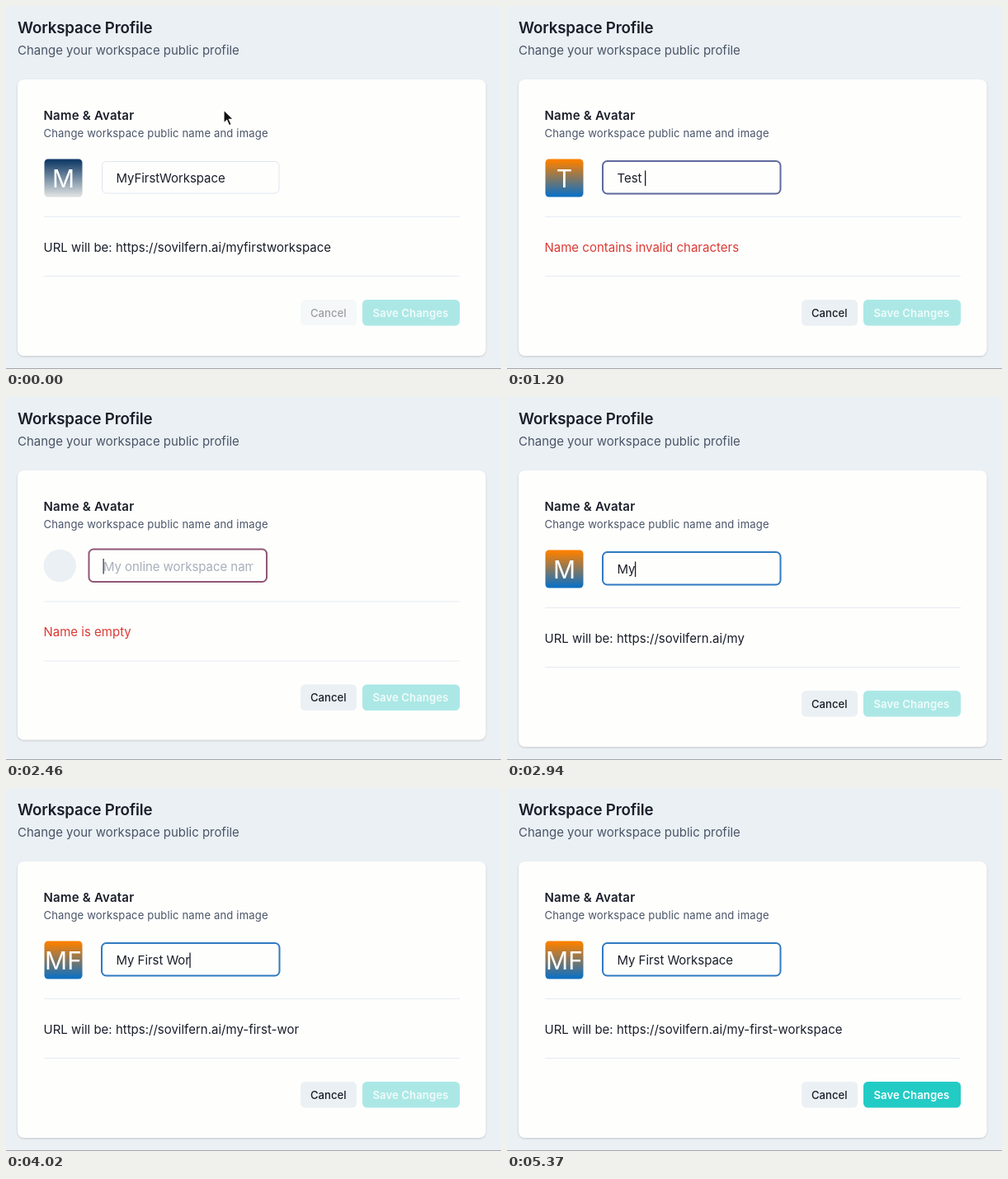
An HTML page that plays this animation: 600x440 px, repeating every 5400 ms.

```html
<!DOCTYPE html>
<html lang="en">
<head>
<meta charset="utf-8">
<title>Workspace profile</title>
<style>
  html, body { margin: 0; width: 100%; height: 100%; overflow: hidden; background: #ebf0f4; }
  svg { display: block; width: 600px; height: 440px; }
  text { font: 400 15px Inter, "Liberation Sans", sans-serif; fill: #1a1e29; white-space: pre; }
  .title { font-size: 18.7px; font-weight: 600; letter-spacing: -.15px; }
  .muted { fill: #4a5568; }
  .subtitle { letter-spacing: -.03px; }
  .strong { font-weight: 600; letter-spacing: .22px; }
  .small { font-size: 13.1px; letter-spacing: .13px; }
  .button { font-size: 13.1px; font-weight: 500; }
  .save { font-weight: 600; letter-spacing: .1px; }
  #name { letter-spacing: -.06px; }
  #message { letter-spacing: 0; }
  #initials { font-size: 30px; fill: #fff; text-anchor: middle; }
  .rule { stroke: #e6ebf2; }
</style>
</head>
<body>
<svg viewBox="0 0 600 440">
  <defs>
    <linearGradient id="fade" x1="0" y1="0" x2="0" y2="1">
      <stop offset=".05"/><stop offset=".95"/>
    </linearGradient>
    <clipPath id="inside"><rect x="132" y="190" width="183" height="36"/></clipPath>
    <filter id="shadow" x="-5%" y="-5%" width="110%" height="110%">
      <feDropShadow dx="0" dy="1" stdDeviation="1.2" flood-color="#1a202c" flood-opacity=".2"/>
    </filter>
  </defs>

  <rect width="600" height="440" fill="#ebf0f4"/>
  <rect y="439" width="600" height="1" fill="#a3a6ac"/>
  <text class="title" x="14" y="33">Workspace Profile</text>
  <text class="muted subtitle" x="14" y="59">Change your workspace public profile</text>

  <rect id="card" x="14" y="89" width="567.5" height="335" rx="8" fill="#fefefd" filter="url(#shadow)"/>
  <text class="strong" x="45.5" y="138">Name &amp; Avatar</text>
  <text class="muted small" x="45.5" y="158.5">Change workspace public name and image</text>

  <circle id="blank" cx="65.3" cy="204.5" r="19.7" fill="#ebf0f4"/>
  <g id="avatar">
    <rect x="46.5" y="185.5" width="46" height="46" rx="4.5" fill="url(#fade)"/>
    <text id="initials" x="69.5" y="219.5"></text>
  </g>

  <g id="field">
    <rect id="border" fill="#fefefd"/>
    <g clip-path="url(#inside)">
      <rect id="selection" x="133" y="199" height="19" fill="#b7d8f8"/>
      <text id="name" x="133.5" y="214"></text>
    </g>
    <rect id="caret" y="199.5" width="1.3" height="18.5"/>
  </g>

  <g id="lower">
    <path class="rule" d="M46 255.5H550M46 327.5H550"/>
    <text id="message" x="45.5" y="297.5"></text>
    <g id="cancel">
      <rect x="357" y="356" width="68" height="31.5" rx="5.5" fill="#ebf0f4"/>
      <text class="button" x="369" y="376.5">Cancel</text>
    </g>
    <rect id="save" x="432" y="356" width="118" height="31.5" rx="5.5"/>
    <text id="saveLabel" class="button save" x="444.5" y="376.5">Save Changes</text>
  </g>

  <path id="arrow" d="M0 0V15.8L3.7 12.4 6.5 18.7 9.2 17.5 6.4 11.4H11.5Z" fill="#111" stroke="#fff" stroke-width="1.1"/>
  <path id="beam" d="M-3-8Q0-8 0-5V5Q0 8-3 8M3-8Q0-8 0-5V5Q0 8 3 8" fill="none" stroke="#222"/>
</svg>

<script>
const LOOP = 5400, STEP = 30;
const FIRST = "MyFirstWorkspace";
const ADDRESS = "https://sovilfern.ai/";
const FOCUS = 240, SELECT = 300, CLEAR = 390, SAVE = 4890;
const GREY = [224, 230, 240], BLUE = [49, 122, 192], RED = [214, 60, 62];

const gradients = {
  night: ["#123c68", "#d9dddd"],
  dusk: ["#f98000", "#1070c0"],
  lagoon: ["#109bf0", "#85eda8"],
  ember: ["#fc4322", "#da1c62"]
};

// Start time, field content, avatar gradient
const edits = [
  [0, FIRST, "night"], [CLEAR, "", "night"],
  [540, "T", "lagoon"], [690, "Te", "ember"], [840, "Tes", "night"], [990, "Test", "lagoon"],
  [1170, "Test ", "dusk"],
  [1890, "Test", "lagoon"], [2010, "Tes", "night"], [2130, "Te", "ember"], [2250, "T", "lagoon"],
  [2390, "", "night"],
  [2740, "M", "ember"], [2880, "My", "dusk"], [3060, "My ", "night"],
  [3180, "My F", "ember"], [3290, "My Fi", "dusk"], [3400, "My Fir", "night"], [3510, "My Firs", "lagoon"],
  [3630, "My First", "ember"], [3720, "My First ", "dusk"],
  ...[..."Workspace"].map((_, i, word) => [
    i < 8 ? 3810 + i * 90 : 4560,
    "My First " + word.slice(0, i + 1).join(""),
    ["lagoon", "night", "dusk", "lagoon", "ember", "night", "lagoon", "ember", "dusk"][i]
  ])
];

const el = {};
document.querySelectorAll("[id]").forEach(node => el[node.id] = node);
const stops = el.fade.children;

const clamp = v => Math.max(0, Math.min(1, v));
const easeOut = v => 1 - (1 - clamp(v)) ** 2;
const mix = (a, b, p) => `rgb(${a.map((v, i) => Math.round(v + (b[i] - v) * p))})`;
const show = (node, on) => node.setAttribute("visibility", on ? "visible" : "hidden");
const set = (node, attrs) => {
  for (const key in attrs) node.setAttribute(key, attrs[key]);
};
const invalid = text => !text || text.endsWith(" ");
const initials = text => text.trim().split(" ").slice(0, 2).map(word => word[0]).join("");
const slug = text => text.toLowerCase().replaceAll(" ", "-");

function borderColour(t, index) {
  if (t < FOCUS) return mix(GREY, GREY, 0);
  const bad = invalid(edits[index][1]);
  let start = index;
  while (start > 0 && invalid(edits[start - 1][1]) === bad) start--;
  if (start === 0) return mix(GREY, BLUE, easeOut((t - FOCUS) / 150));
  return mix(bad ? BLUE : RED, bad ? RED : BLUE, easeOut((t - edits[start][0]) / 200));
}

function drawField(t, index, text) {
  const focused = t >= FOCUS, empty = !text;
  set(el.border, focused
    ? { x: 116, y: 188, width: 215.5, height: 39.5, rx: 5.5, "stroke-width": 2 }
    : { x: 116.5, y: 188.5, width: 214.5, height: 38.5, rx: 5, "stroke-width": 1 });
  el.border.setAttribute("stroke", borderColour(t, index));
  el.field.setAttribute("transform", empty ? "translate(-15.5 -3.5)" : "");
  el.name.textContent = text || "My online workspace name";
  el.name.style.fill = empty ? "#a8aeba" : "";

  const selected = t >= SELECT && t < CLEAR;
  const width = empty ? 0 : el.name.getComputedTextLength();
  el.selection.setAttribute("width", width);
  show(el.selection, selected);
  const lastInput = Math.max(FOCUS, edits[index][0]);
  const blinkOn = (t - lastInput) % 1000 < 500;
  el.caret.setAttribute("x", 133 + width);
  el.caret.setAttribute("fill", empty ? "#34405c" : "#1a1e29");
  show(el.caret, focused && !selected && blinkOn);
}

function drawAvatar(text, gradient) {
  show(el.blank, !text);
  show(el.avatar, text);
  el.initials.textContent = text ? initials(text) : "";
  gradients[gradient].forEach((colour, i) => stops[i].setAttribute("stop-color", colour));
}

function drawLower(t, text) {
  const empty = !text, bad = invalid(text);
  el.card.setAttribute("height", empty ? 326.5 : 335);
  el.lower.setAttribute("transform", empty ? "translate(0 -7.5)" : "");
  el.message.textContent = empty ? "Name is empty"
    : bad ? "Name contains invalid characters"
    : "URL will be: " + ADDRESS + slug(text);
  el.message.style.fill = bad ? "#dc3a34" : "";
  el.cancel.setAttribute("opacity", text === FIRST ? .42 : 1);
  const ready = easeOut((t - SAVE) / 200);
  el.save.setAttribute("fill", mix([171, 232, 229], [35, 203, 197], ready));
  el.saveLabel.style.fill = mix([240, 251, 251], [255, 255, 255], ready);
}

function drawPointer(t) {
  const p = clamp((t - 30) / 180), glide = p * p * (3 - 2 * p);
  const x = 264 - 24 * glide, y = 126 + 83 * glide;
  const overField = y > 188;
  for (const node of [el.arrow, el.beam]) node.setAttribute("transform", `translate(${x} ${y})`);
  show(el.arrow, t < CLEAR && !overField);
  show(el.beam, t < CLEAR && overField);
}

function draw(t) {
  const index = edits.findLastIndex(([start]) => start <= t);
  const [, text, gradient] = edits[index];
  drawField(t, index, text);
  drawAvatar(text, gradient);
  drawLower(t, text);
  drawPointer(t);
}

const begin = performance.now();
function tick(now) {
  const elapsed = Math.max(0, now - begin) % LOOP;
  draw(Math.floor(elapsed / STEP) * STEP);
  requestAnimationFrame(tick);
}
draw(0);
requestAnimationFrame(tick);
</script>
</body>
</html>
```
